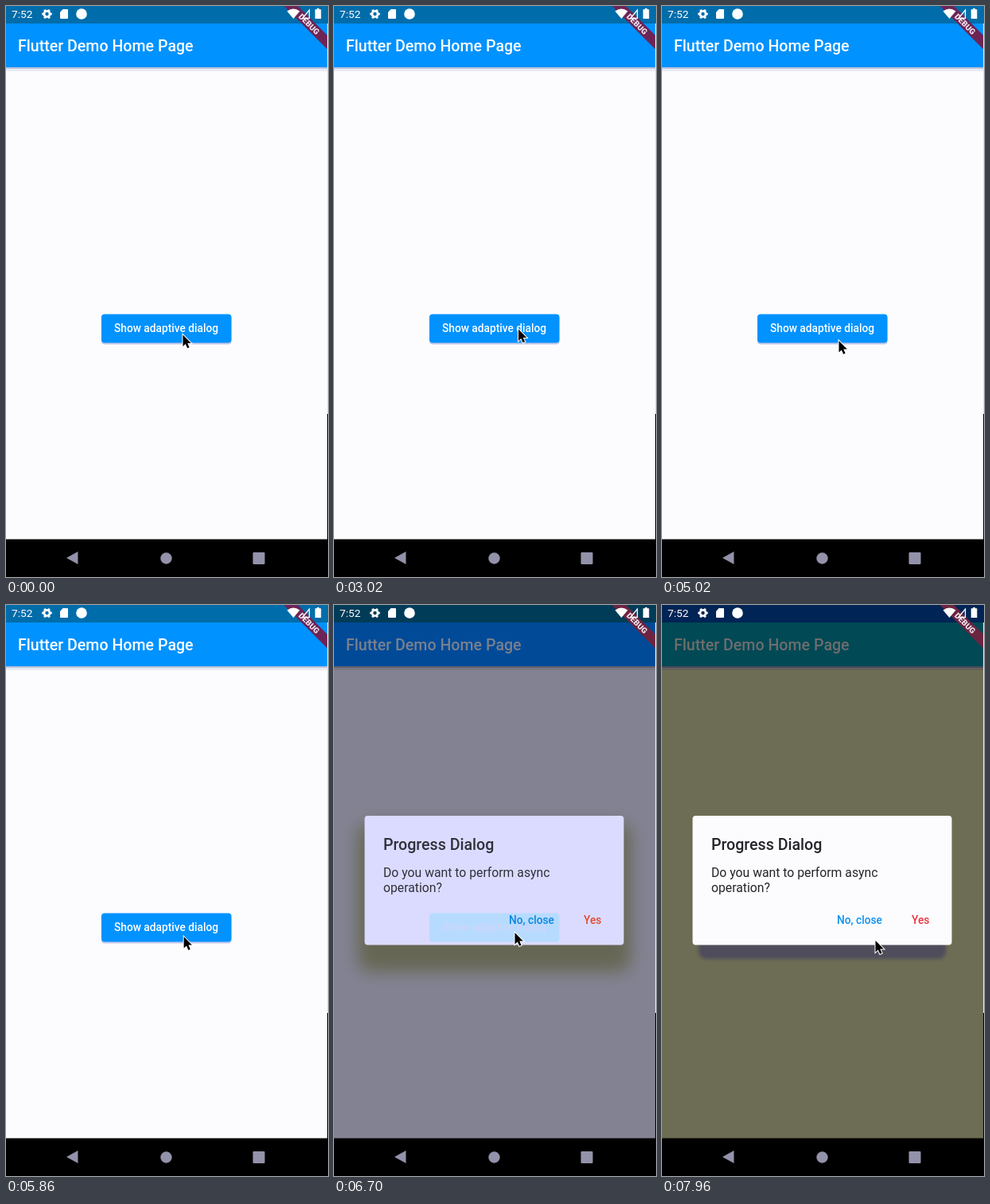
An HTML page for the animation above (8 s loop, 405 by 718 pixels).

```html
<!DOCTYPE html>
<html lang="en">
<head>
<meta charset="utf-8">
<title>Adaptive dialog</title>
<style>
html, body { margin: 0; width: 100%; height: 100%; overflow: hidden; background: #000; }
svg {
  display: block; font-family: Roboto, sans-serif;
  --status: #006daa; --bar: #0092ff; --title: #fff; --page: #fcfcff;
  --line: #b9c4dc; --band: #6d2455;
}
svg.mid {
  --status: #003c58; --bar: #004a98; --title: #78808e; --page: #828292;
  --line: #62626c; --band: #6d2440;
  --card: #dbdbff; --ink: #30303c; --no: #0d86e0; --yes: #e04a30;
  --ghost: #b6dbff; --ghostInk: #cfd4fa;
}
svg.open {
  --status: #002455; --bar: #004955; --title: #6d6d6d; --page: #6d6d55;
  --line: #49495f; --band: #6d2440;
  --card: #fcfcff; --ink: #24242a; --no: #0c92f0; --yes: #e8343e;
  --ghost: #e9e8fc; --ghostInk: #fbfaff;
}
.big { font-size: 19.6px; font-weight: 500; }
.label { font-size: 13.72px; font-weight: 500; }
.body { font-size: 15.75px; }
</style>
</head>
<body>
<svg id="stage" width="405" height="718" viewBox="0 0 405 718">
  <defs>
    <clipPath id="buttonClip"><rect x="120" y="387.5" width="163.5" height="36" rx="4"/></clipPath>
    <clipPath id="screen"><rect width="404" height="671"/></clipPath>
  </defs>

  <rect width="405" height="671" style="fill:var(--page)"/>
  <rect y="77" width="404" height="2" style="fill:var(--line)"/>
  <rect y="79" width="404" height="3" style="fill:var(--line)" opacity=".3"/>
  <rect y="22" width="404" height="55" style="fill:var(--bar)"/>
  <rect width="405" height="22" style="fill:var(--status)"/>
  <text class="big" x="15" y="56.5" style="fill:var(--title)">Flutter Demo Home Page</text>

  <g id="button">
    <rect id="lift" x="119" y="391" width="166" height="40" rx="6" fill="#d6d2f8"/>
    <rect id="rim" x="127" y="421" width="153" height="4.5" rx="2" fill="#b6b680"/>
    <rect x="120" y="389" width="163.5" height="36.5" rx="4" fill="#c4c6e8"/>
    <rect x="120" y="387.5" width="163.5" height="36" rx="4" fill="#0092ff"/>
    <circle id="ripple" cx="225" cy="414" fill="#fff" opacity=".25" clip-path="url(#buttonClip)"/>
    <text class="label" x="136" y="410" fill="#fff">Show adaptive dialog</text>
  </g>

  <g id="dialog">
    <rect id="shadow"/>
    <rect x="38.5" y="265" width="326" height="162.5" rx="4" style="fill:var(--card)"/>
    <g id="ghost">
      <rect id="tint" x="38.5" y="265" width="326" height="162.5" rx="4" fill="#f3f2ff"/>
      <rect x="120" y="387.5" width="163.5" height="36" rx="4" style="fill:var(--ghost)"/>
      <text class="label" x="136" y="410" style="fill:var(--ghostInk)">Show adaptive dialog</text>
    </g>
    <g style="fill:var(--ink)">
      <text class="big" x="62" y="307.5">Progress Dialog</text>
      <text class="body" x="62" y="342">Do you want to perform async</text>
      <text class="body" x="62" y="360.5">operation?</text>
    </g>
    <text class="label" x="220" y="401" style="fill:var(--no)">No, close</text>
    <text class="label" x="314" y="401" style="fill:var(--yes)">Yes</text>
  </g>

  <g clip-path="url(#screen)">
    <g transform="translate(381.2 22.8) rotate(45)">
      <rect x="-50" y="-6.2" width="100" height="12.4" style="fill:var(--band)"/>
      <text y="3.6" font-size="10" font-weight="900" text-anchor="middle" fill="#f0e4ee">DEBUG</text>
    </g>
  </g>

  <g fill="#fff">
    <text x="7" y="15" font-size="13.7">7:52</text>
    <g fill="none" stroke="#fff">
      <circle cx="51.5" cy="10" r="3.6" stroke-width="2.8"/>
      <circle cx="51.5" cy="10" r="5.3" stroke-width="2" pathLength="12" stroke-dasharray="1 1" stroke-dashoffset=".5"/>
      <path d="M373 15.5L381.5 5V15.5Z" stroke-width="1.3"/>
    </g>
    <path d="M68 8L71.500 4H77Q78 4 78 5V15Q78 16 77 16H69Q68 16 68 15Z"/>
    <circle cx="95" cy="10" r="6.8"/>
    <path d="M353.500 6.500Q361.500 0.500 369.500 6.500L361.500 16Z"/>
    <path d="M391 3H394V4.300H396.300V16H388.700V4.300H391Z"/>
  </g>

  <rect y="670.5" width="405" height="47.5"/>
  <rect x="404" y="22" width="1" height="491" fill="#e4e4ea"/>
  <rect x="404" y="513" width="1" height="205"/>
  <g fill="#9292aa">
    <path d="M76 694L90.500 686V702Z"/>
    <circle cx="201.500" cy="694.500" r="7.200"/>
    <rect x="310.500" y="687" width="15" height="15" rx="1"/>
  </g>

  <path id="pointer" d="M0 0V14.500L3.300 11.500L5.700 16.800L8.100 15.700L5.800 10.500H10.300Z" stroke="#fff" stroke-width="2" paint-order="stroke"/>
</svg>
<script>
const LOOP = 8000, MID = 6700, OPEN = 6800, SETTLED = 7220;
const $ = id => document.getElementById(id);
const set = (id, attrs) => { for (const k in attrs) $(id).setAttribute(k, attrs[k]); };
const show = (id, on) => { $(id).style.display = on ? '' : 'none'; };
const mix = (a, b, p) => a + (b - a) * p;

// Pointer tip: time, x, y
const path = [
  [0, 222.5, 413.5], [20, 222.5, 413.5], [380, 226, 411], [1340, 226, 411],
  [1480, 228, 410], [2500, 228, 410], [3020, 232, 406.5], [3300, 232, 407],
  [5020, 222.5, 421], [5720, 223, 418], [6660, 227.5, 412], [7760, 227.5, 412],
  [7840, 243, 418], [7920, 263, 424], [7960, 268.5, 422], [LOOP, 268.5, 422]
];

function tip(t) {
  if (t > 7760) t = Math.floor(t / 40) * 40;
  const i = path.findIndex(p => p[0] > t), [t0, x0, y0] = path[i - 1], [t1, x1, y1] = path[i];
  const p = (t - t0) / (t1 - t0);
  return [mix(x0, x1, p), mix(y0, y1, p)];
}

function draw(t) {
  const mid = t >= MID && t < OPEN, open = t >= OPEN, pressed = t >= 6660 && t < MID;
  $('stage').setAttribute('class', mid ? 'mid' : open ? 'open' : '');
  show('button', t < MID);
  show('dialog', t >= MID);
  show('tint', open);
  show('lift', pressed);
  show('rim', pressed);
  set('ripple', { r: pressed ? (t < 6680 ? 24 : 32) : 0 });

  const settle = Math.min(1, Math.max(0, (t - 6820) / (SETTLED - 6820)));
  set('ghost', { opacity: 1 - settle });
  if (mid) {
    set('shadow', { x: 30, y: 275, width: 343, height: 186, rx: 16, fill: '#62624a', opacity: .85 });
  } else {
    const x = mix(53, 46, settle);
    set('shadow', { x, y: 400, width: 403 - 2 * x, height: mix(36, 45, settle), rx: 9, fill: '#4c4a5c', opacity: .9 });
  }
  $('shadow').style.filter = `blur(${mid ? 10 : 2}px)`;

  const [x, y] = tip(t);
  set('pointer', { transform: `translate(${x} ${y})` });
}

const start = performance.now();
function tick() {
  draw((performance.now() - start) % LOOP);
  requestAnimationFrame(tick);
}
tick();
</script>
</body>
</html>
```
